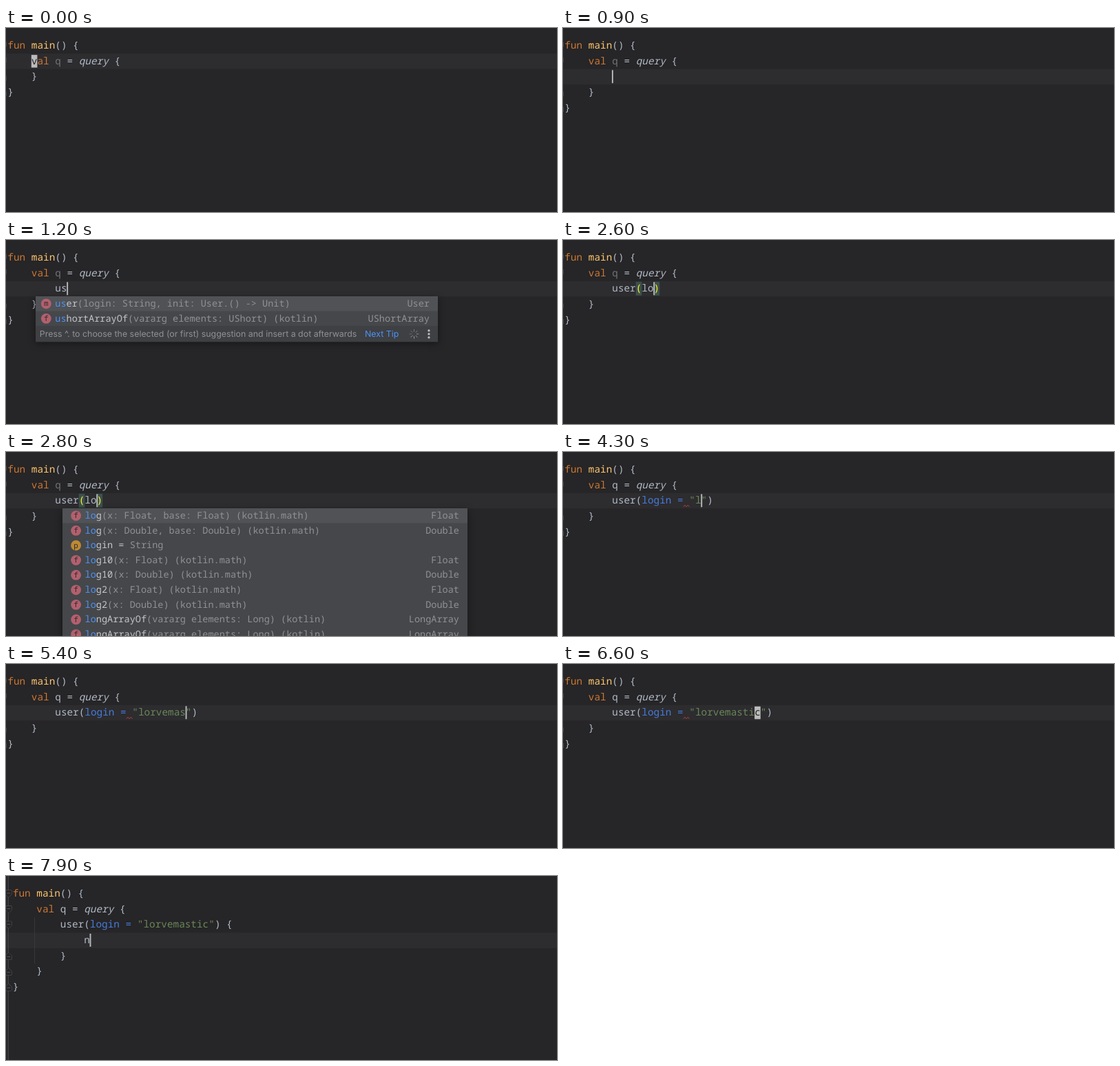
An HTML page with a canvas that plays this animation: 800x268 px, repeating every 8000 ms.

```html
<!DOCTYPE html>
<html lang="en">
<head>
<meta charset="utf-8">
<title>Code completion</title>
<style>
html, body { margin: 0; width: 100%; height: 100%; overflow: hidden; background: #262527; }
canvas { display: block; width: 800px; height: 268px; }
</style>
</head>
<body>
<canvas id="stage"></canvas>
<script>
const W = 800, H = 268, LOOP = 8000;
const PITCH = 8.62, ROW = 22.65, TOP = 14.5, ITEM = 21.6;
const MONO = '"Noto Sans Mono", "DejaVu Sans Mono", monospace';
const CODE = `14.37px ${MONO}`, LIST = `13.55px ${MONO}`;
const HINT = '12.4px Inter, "Open Sans", sans-serif';
const C = {
  bg: '#262527', row: '#2d2c2f', text: '#b0bac6', key: '#cc7832', fn: '#ffc66d',
  unused: '#727377', str: '#6a8759', arg: '#467cda', caret: '#bbbbbb',
  pair: '#ffef28', pairBg: '#3b514d', error: '#bc3f3c', fold: '#5b5b5d',
  popup: '#45474a', selected: '#505255', foot: '#3e4043',
  name: '#c3c5c8', dim: '#8f9194', match: '#4d92f5', pink: '#b2606e', amber: '#be8a34'
};
const LOGIN = 'lorvemastic';

const canvas = document.getElementById('stage');
const ctx = canvas.getContext('2d');
const dpr = window.devicePixelRatio || 1;
canvas.width = W * dpr;
canvas.height = H * dpr;
ctx.scale(dpr, dpr);
ctx.textRendering = 'geometricPrecision';

// Completion entries: icon, name, details, type
const USER = ['m', 'user', '(login: String, init: User.() -> Unit)', 'User'];
const arrayOf = type => {
  const name = type.startsWith('U') ? 'u' + type.slice(1).toLowerCase() : type.toLowerCase();
  return ['f', `${name}ArrayOf`, `(vararg elements: ${type}) (kotlin)`, `${type}Array`];
};
const math = (name, type, base = '') =>
  ['f', name, `(x: ${type}${base && `, base: ${type}`}) (kotlin.math)`, type];
const LOGS = [
  math('log', 'Float', 'base'), math('log', 'Double', 'base'),
  ['p', 'login =', ' String', ''],
  math('log10', 'Float'), math('log10', 'Double'),
  math('log2', 'Float'), math('log2', 'Double')
];
const UNSIGNED = ['UByte', 'UInt', 'ULong', 'UShort'].map(arrayOf);
const USE = ['f', 'use', '(block: (T) -> R) (kotlin.io)', 'R'];

const userBox = (items, match, busy) =>
  ({ items, match, busy, sel: 0, left: 43, right: 627, x: 71.3 });
const logBox = (items, match, sel) =>
  ({ items, match, sel, left: 82, right: 670, x: 114.6 });

// Each step: time, text of the edited line, caret column, extras
const steps = [
  [0, null, 4, { block: true }],
  [500, '', 8],
  [1000, 'u', 9],
  [1100, 'u', 9, { popup: userBox([USER, ...UNSIGNED, USE], 1, true) }],
  [1200, 'us', 10, { popup: userBox([USER, UNSIGNED[3]], 2, true) }],
  [1400, 'use', 11, { popup: userBox([USER], 3) }],
  [1500, 'user', 12, { popup: userBox([USER], 4) }],
  [1700, 'user()', 13, { pair: true }],
  [2500, 'user(l)', 14, { pair: true }],
  [2600, 'user(lo)', 15, { pair: true }],
  [2700, 'user(lo)', 15, { pair: true, popup: logBox([...LOGS, arrayOf('Long'), arrayOf('Long')], 2, 0) }],
  [2900, 'user(log)', 16, { pair: true, popup: logBox(LOGS, 3, 0) }],
  [3000, 'user(log)', 16, { pair: true, popup: logBox(LOGS, 3, 1) }],
  [3100, 'user(log)', 16, { pair: true, popup: logBox(LOGS, 3, 2) }],
  [3500, 'user(login = )', 21, { pair: true }],
  [4000, 'user(login = "")', 22]
];
const typed = [4300, 4500, 4700, 4800, 4900, 5000, 5200, 5300, 5600, 5800, 5900];
typed.forEach((t, i) => steps.push([t, `user(login = "${LOGIN.slice(0, i + 1)}")`, 23 + i]));
const call = `user(login = "${LOGIN}")`;
steps.push(
  [6400, call, 32, { block: true }],
  [6800, call, 33, { block: true }],
  [6900, call, 34, { block: true }],
  [7000, call, 35],
  [7200, call + ' ', 36],
  [7300, call + ' {}', 37],
  [7500, call + ' {', 12, { body: '' }],
  [7900, call + ' {', 13, { body: 'n' }]
);

let left = 0;
const colX = col => left + col * PITCH;
const rowY = row => TOP + row * ROW;

function rect(x, y, w, h, color) {
  ctx.fillStyle = color;
  ctx.fillRect(x, y, w, h);
}

function write(text, x, y, color, font, align = 'left') {
  ctx.font = font;
  ctx.textAlign = align;
  ctx.fillStyle = color;
  ctx.fillText(text, x, y);
}

function code(row, col, text, color = C.text, style = '') {
  write(text, colX(col), rowY(row) + 15.6, color, style + CODE);
}

function disc(x, y, r, color) {
  ctx.fillStyle = color;
  ctx.beginPath();
  ctx.arc(x, y, r, 0, 7);
  ctx.fill();
}

function line(points, color, close) {
  ctx.strokeStyle = color;
  ctx.lineWidth = 1;
  ctx.beginPath();
  points.forEach(([x, y]) => ctx.lineTo(x, y));
  if (close) ctx.closePath();
  ctx.stroke();
}

function fold(row, up) {
  const x = left - 9.8, y = rowY(row) + 11.5, d = up ? -1 : 1;
  ctx.fillStyle = C.bg;
  line([[x - .5, y - 5 * d], [x + 8, y - 5 * d], [x + 8, y + d], [x + 3.7, y + 5 * d], [x - .5, y + d]], C.fold, true);
  ctx.fill();
  line([[x + 1.5, y - d], [x + 6, y - d]], C.fold);
}

function callLine(text, pair) {
  const parts = text.match(/login =|"[^"]*"|[^"]+?(?=login =|"|$)/g) || [];
  let col = 8;
  for (const part of parts) {
    code(2, col, part, part === 'login =' ? C.arg : part[0] === '"' ? C.str : C.text);
    col += part.length;
  }
  if (pair) {
    for (const [c, s] of [[12, '('], [8 + text.indexOf(')'), ')']]) {
      rect(colX(c), rowY(2) + 1, PITCH, 20, C.pairBg);
      code(2, c, s, C.pair);
    }
  }
}

function squiggle() {
  const y = rowY(2) + 19;
  const pts = Array.from({ length: 5 }, (_, i) => [colX(20) + i * 2.2, y + (i % 2 ? -1.5 : 1)]);
  line(pts, C.error);
}

function spinner(x, y, t) {
  const lead = Math.floor(t / 100) % 8;
  for (let i = 0; i < 8; i++) {
    const a = i * Math.PI / 4, c = Math.cos(a), s = Math.sin(a);
    ctx.globalAlpha = .35 + .5 * ((i - lead + 8) % 8) / 8;
    ctx.lineCap = 'round';
    line([[x + c * 3.5, y + s * 3.5], [x + c * 6.5, y + s * 6.5]], '#b5b7ba');
  }
  ctx.globalAlpha = 1;
  ctx.lineCap = 'butt';
}

function popup({ items, match, sel, busy, left: x0, right: x1, x }, t) {
  const top = 82, w = x1 - x0, foot = top + items.length * ITEM, mid = foot + 11.7;
  ctx.save();
  ctx.shadowColor = 'rgba(0,0,0,.4)';
  ctx.shadowBlur = 10;
  ctx.shadowOffsetY = 3;
  rect(x0, top, w, foot + 23 - top, C.popup);
  ctx.restore();
  rect(x0, top + sel * ITEM, w, ITEM, C.selected);
  rect(x0, foot, w, 23, C.foot);

  const step = 13.55 * .6;
  items.forEach(([icon, name, details, type], i) => {
    const y = top + i * ITEM, base = y + 15;
    disc(x - 13, y + 10.8, 7.4, icon === 'p' ? C.amber : C.pink);
    write(icon, x - 13, y + 14.3, '#36282b', `11px ${MONO}`, 'center');
    write(name.slice(0, match), x, base, C.match, LIST);
    write(name.slice(match), x + match * step, base, C.name, LIST);
    write(details, x + name.length * step, base, C.dim, LIST);
    write(type, x1 - 12, base, C.dim, LIST, 'right');
  });

  write('Press ^. to choose the selected (or first) suggestion and insert a dot afterwards',
    x - 22.5, mid + 4.4, C.dim, HINT);
  write('Next Tip', x + 449.7, mid + 4.4, C.match, HINT);
  if (busy) spinner(x1 - 34.5, mid, t);
  for (const d of [-5, 0, 5]) disc(x1 - 13, mid + d, 1.6, '#c0c2c4');
}

function caret(row, col, block, under) {
  const y = rowY(row) + 2;
  if (!block) return rect(colX(col) - .3, y - .5, 1.9, 19, C.caret);
  rect(colX(col), y, PITCH, 18.5, C.caret);
  code(row, col, under, C.bg);
}

function draw(t) {
  const [, text, col, extra = {}] = steps.filter(s => s[0] <= t).pop();
  const { block, pair, body } = extra;
  const opened = text !== null, nested = body !== undefined;
  const row = nested ? 3 : opened ? 2 : 1;
  const end = nested ? 5 : opened ? 3 : 2;
  left = nested ? 9.8 : 2.3;

  rect(0, 0, W, H, C.bg);
  rect(0, rowY(row), W, ROW, C.row);
  if (nested) {
    rect(2.7, 0, 1, H, '#4b4b4d');
    rect(41, rowY(2), 1, ROW * 3, '#38383a');
  }
  fold(0);
  fold(1);
  if (nested) {
    fold(2);
    fold(4, true);
  }
  fold(end, true);
  fold(end + 1, true);

  code(0, 0, 'fun', C.key);
  code(0, 4, 'main', C.fn);
  code(0, 8, '() {');
  code(1, 4, 'val', C.key);
  code(1, 8, 'q', t < 3700 ? C.unused : C.text);
  code(1, 10, '=');
  code(1, 12, 'query', C.text, 'italic ');
  code(1, 18, '{');
  if (opened) callLine(text, pair);
  if (t >= 3600 && !nested) squiggle();
  if (nested) {
    code(3, 12, body);
    code(4, 8, '}');
  }
  code(end, 4, '}');
  code(end + 1, 0, '}');

  caret(row, col, block, opened ? text[col - 8] : 'v');
  if (extra.popup) popup(extra.popup, t);
}

function tick() {
  draw(performance.now() % LOOP);
  requestAnimationFrame(tick);
}
tick();
</script>
</body>
</html>
```
